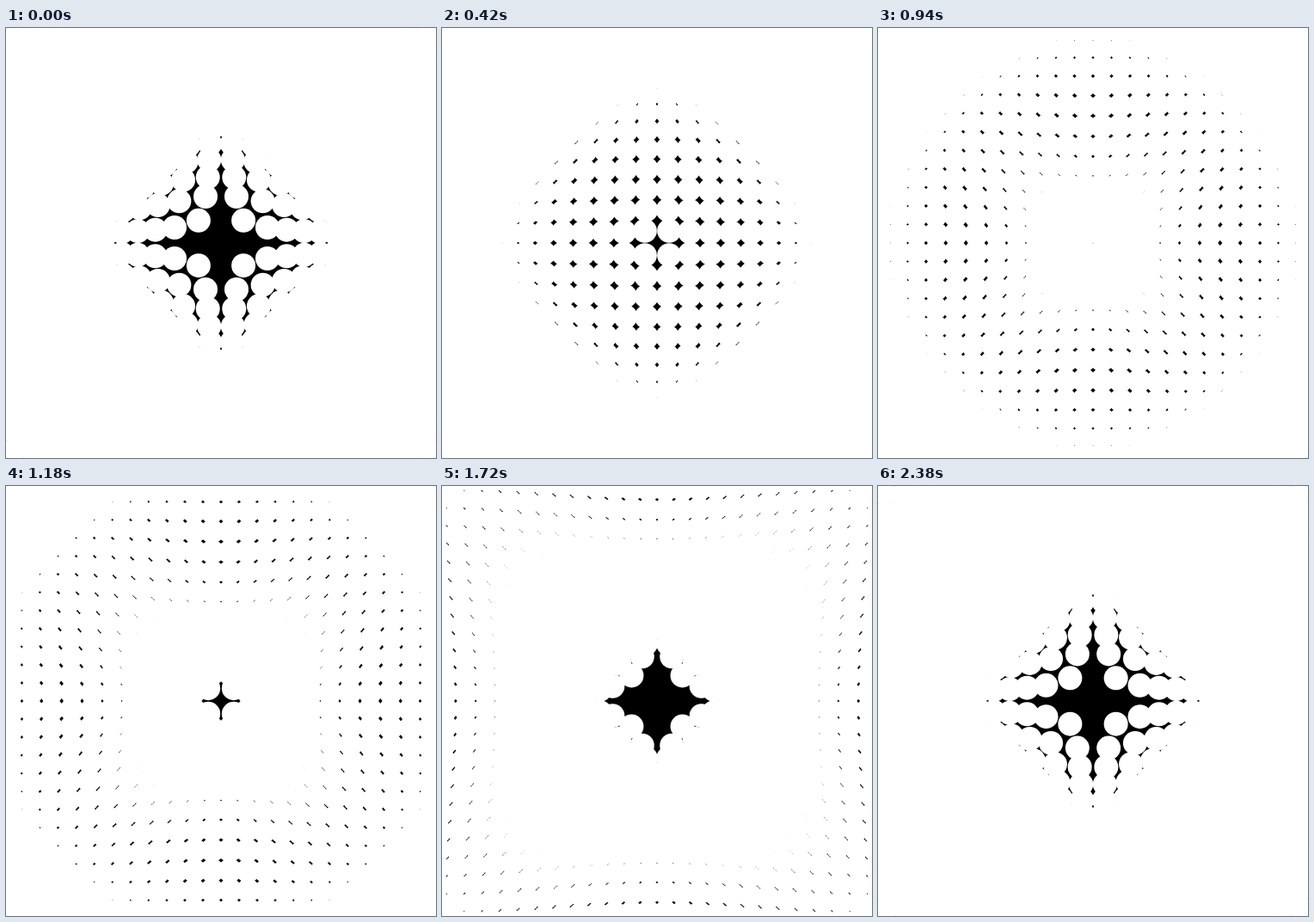
An HTML page with a canvas that plays this animation: 500 by 500 pixels, repeating every 2.4 s.

```html
<!DOCTYPE html>
<html lang="en">
<head>
<meta charset="utf-8">
<title>Dot ripple</title>
<style>
  html, body { margin: 0; width: 100%; height: 100%; overflow: hidden; background: #fff; }
  canvas { display: block; }
</style>
</head>
<body>
<canvas id="stage" width="500" height="500"></canvas>
<script>
const SIZE = 500;
const LOOP = 2400;
const STEP = 20;
const SPACING = 18.5;
const RADIUS = 14;
const SWING = 16.25;
const WAVELENGTH = 350;
const CREST = 73.4;      // distance of the wave crest when the loop starts
const HALF_GRID = 20;
const TAU = Math.PI * 2;

const ctx = document.getElementById("stage").getContext("2d");

// Square lattice of dots, none of them on the centre.
const dots = [];
for (let row = -HALF_GRID; row < HALF_GRID; row++) {
  for (let col = -HALF_GRID; col < HALF_GRID; col++) {
    const x = (col + 0.5) * SPACING;
    const y = (row + 0.5) * SPACING;
    dots.push({ x, y, dist: Math.hypot(x, y) });
  }
}

// Outward push of a dot by the travelling wave; never negative.
function push(dist, time) {
  return SWING * (1 + Math.cos(TAU * (time / LOOP - (dist - CREST) / WAVELENGTH)));
}

function draw(time) {
  ctx.setTransform(1, 0, 0, 1, 0, 0);
  ctx.fillStyle = "#000";
  ctx.fillRect(0, 0, SIZE, SIZE);
  ctx.translate(SIZE / 2, SIZE / 2);
  ctx.fillStyle = "#fff";
  for (const { x, y, dist } of dots) {
    const scale = 1 + push(dist, time) / dist;
    ctx.beginPath();
    ctx.arc(x * scale, y * scale, RADIUS, 0, TAU);
    ctx.fill();
  }
}

const start = performance.now();
function tick() {
  const elapsed = (performance.now() - start) % LOOP;
  draw(Math.floor(elapsed / STEP) * STEP);
  requestAnimationFrame(tick);
}
tick();
</script>
</body>
</html>
```
